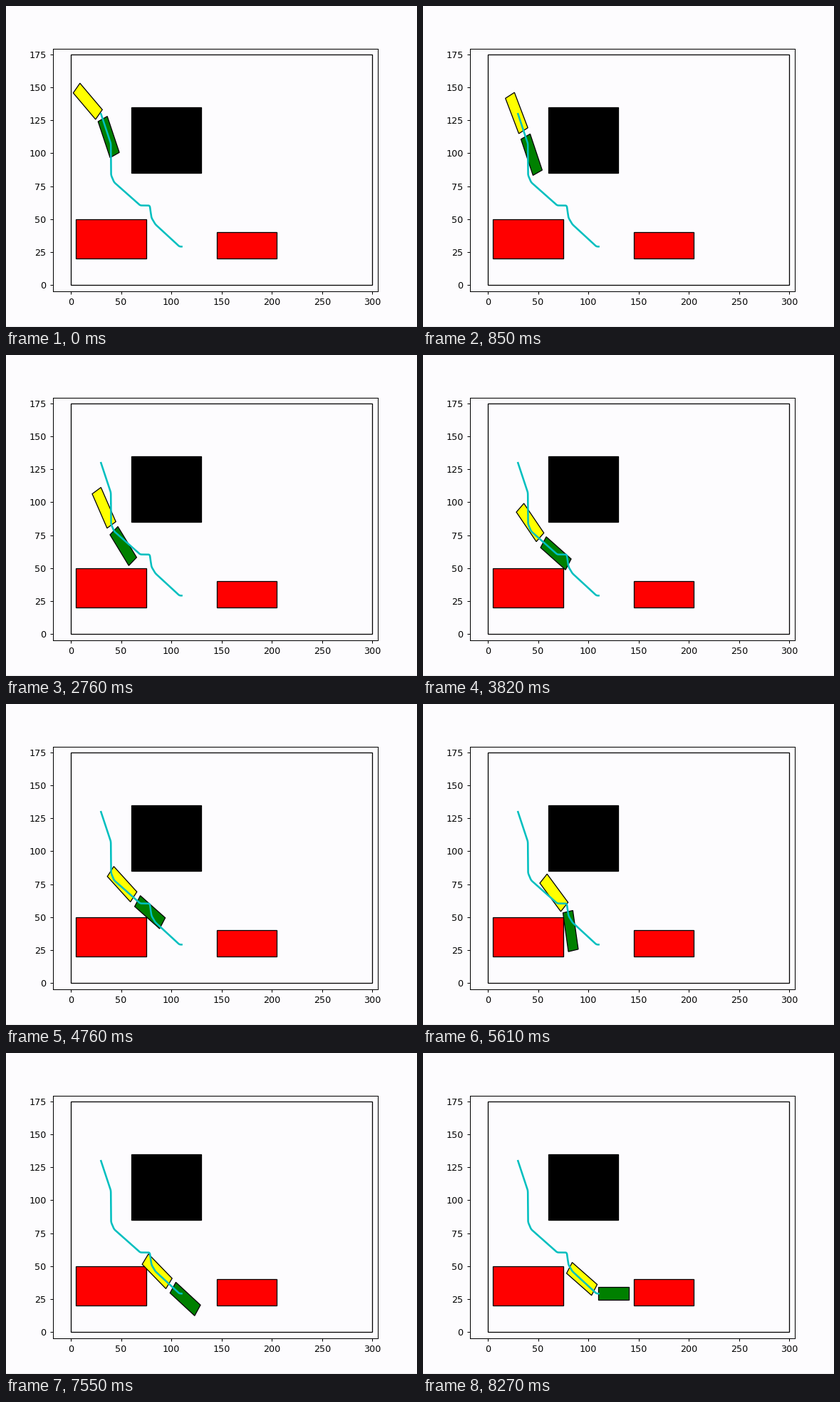
Recreate the animation shown at these times as a matplotlib script. Size 577 px wide and 450 px high, loop 8360 ms.

```python
import numpy as np
import matplotlib.pyplot as plt
from matplotlib.animation import FuncAnimation
from matplotlib.lines import Line2D
from matplotlib.patches import Polygon, Rectangle

W, H, DPI = 577, 450, 100
FRAMES, INTERVAL = 220, 38
END = 8270                      # arrival in ms, the rest is a short hold
K = 0.92                        # scale of matplotlib's default sizes
PAPER = "#fdfcfe"
LENGTH, WIDTH, GAP = 30, 10, 5  # vehicle body and drawbar
STEP, ROUND = 0.1, 3            # sampling of the route, rounding of its bends

plt.rcParams.update({
    "font.family": "DejaVu Sans", "font.size": 10 * K,
    "axes.linewidth": 0.8 * K, "axes.facecolor": PAPER,
})
for tick in ("xtick", "ytick"):
    plt.rcParams.update({f"{tick}.major.width": 0.8 * K,
                         f"{tick}.major.size": 3.5 * K,
                         f"{tick}.major.pad": 3.5 * K})

# corners of the route: time in ms, x, y, trailer heading in degrees
CORNERS = np.array([
    (-220, 30, 130, -36), (1180, 39.8, 107.5, -72), (2560, 40, 83.5, -84),
    (2760, 43, 78, -58), (5000, 69, 60.3, -38), (5330, 78.5, 60.3, -38),
    (5740, 80.2, 51, -50), (6020, 84, 46, -50), (8100, 108, 29, -34),
    (END, 110.2, 29, -34)])


def smooth_route():
    """Sample the corners evenly along the way and round them off."""
    arc = np.r_[0, np.cumsum(np.hypot(*np.diff(CORNERS[:, 1:3], axis=0).T))]
    s = np.arange(0, arc[-1], STEP)
    half = round(ROUND / STEP / 2)
    box = np.ones(2 * half + 1) / (2 * half + 1)
    for column in CORNERS.T:
        v = np.pad(np.interp(s, arc, column), half, "reflect",
                   reflect_type="odd")
        yield np.convolve(v, box, "valid")


ms, xs, ys, tail = smooth_route()
tail = np.radians(tail)
head = np.arctan2(np.gradient(ys), np.gradient(xs))


def body(hitch, angle, start):
    """Corners of a vehicle whose back lies `start` ahead of the hitch."""
    along = np.array([np.cos(angle), np.sin(angle)])
    side = np.array([-along[1], along[0]]) * WIDTH / 2
    back, front = hitch + along * start, hitch + along * (start + LENGTH)
    return [back - side, front - side, front + side, back + side]


fig = plt.figure(figsize=(W / DPI, H / DPI), dpi=DPI, facecolor=PAPER)
ax = fig.add_axes([65.6 / W, 50.1 / H, 456.3 / W, 340.2 / H])
ax.set(xlim=(-18, 305.3), ylim=(-5, 179.7),
       xticks=range(0, 301, 50), yticks=range(0, 176, 25))
fig.add_artist(Line2D([0, 1], [1 / H, 1 / H], color="#ebebed", lw=0.9))


def block(x, y, w, h, color):
    ax.add_patch(Rectangle((x, y), w, h, fc=color, ec="black", lw=K))


block(0, 0, 300, 175, "none")
block(60, 85, 70, 50, "black")
block(5, 20, 70, 30, "red")
block(145, 20, 60, 20, "red")

tractor, trailer = (
    ax.add_patch(Polygon(np.zeros((4, 2)), fc=c, ec="black", lw=K))
    for c in ("green", "yellow"))
ax.plot(xs, ys, color="c", lw=2 * K, solid_joinstyle="round")


def update(i):
    t = min((i + 0.5) * INTERVAL, END)
    x, y, a, b = (np.interp(t, ms, v) for v in (xs, ys, head, tail))
    hitch = np.array([x, y])
    tractor.set_xy(body(hitch, a, 0))
    trailer.set_xy(body(hitch, b, -GAP - LENGTH))
    return tractor, trailer


anim = FuncAnimation(fig, update, frames=FRAMES, interval=INTERVAL,
                     init_func=lambda: update(0), repeat=True, repeat_delay=0)
plt.show()
```
